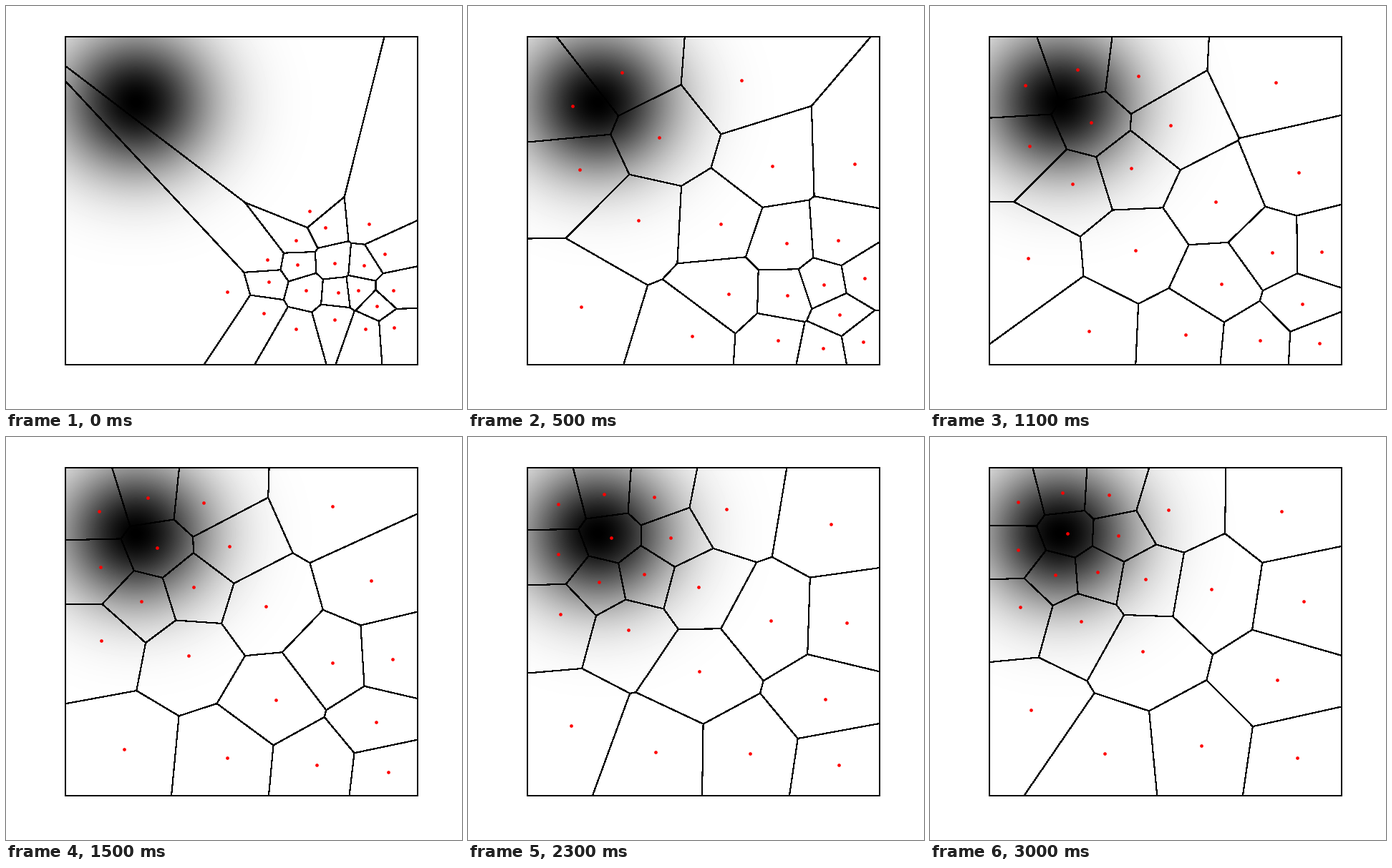
Write a matplotlib script that moves like this. It is 637 px wide and 564 px high and loops after 3.6 s.

```python
import numpy as np
import matplotlib.pyplot as plt
from matplotlib.animation import FuncAnimation
from matplotlib.collections import PolyCollection

WIDTH, HEIGHT, DPI = 637, 564, 64
LEFT, TOP, BOX_W, BOX_H = 83, 43, 492, 459
PX = 72 / DPI                      # one pixel in points
STEPS, HOLD = 31, 5                # relaxation steps, then rest on the last one
PEAK, SIGMA, FLOOR = (0.2, 0.8), 0.15, 0.01

# Starting cluster in pixels; everything after follows from the relaxation.
START = [(424, 287), (446, 310), (507, 305), (405, 328), (529, 347), (364.5, 355),
         (406.5, 362), (459, 360), (500, 363), (367, 386), (419, 398), (464, 401),
         (492, 398), (541, 398), (518, 420), (309, 400), (360, 429.5), (405, 452),
         (459, 439), (501.5, 452), (542, 449.5)]


def grid(cols, rows):
    return np.meshgrid((np.arange(cols) + 0.5) / cols, (np.arange(rows) + 0.5) / rows)


def gauss(x, y):
    return np.exp(-((x - PEAK[0]) ** 2 + (y - PEAK[1]) ** 2) / (2 * SIGMA ** 2))


GX, GY = (g.ravel() for g in grid(BOX_W // 2, BOX_H // 2))
MASS = gauss(GX, GY) + FLOOR


def relax(sites):
    """Move every site to the weighted centroid of its cell (Lloyd's step)."""
    dist = (GX[:, None] - sites[:, 0]) ** 2 + (GY[:, None] - sites[:, 1]) ** 2
    owner = dist.argmin(axis=1)

    def total(weight):
        return np.bincount(owner, weight, len(sites))

    return np.column_stack([total(MASS * GX), total(MASS * GY)]) / total(MASS)[:, None]


def build_track():
    x, y = np.array(START, float).T
    track = [np.column_stack([(x - LEFT) / BOX_W, 1 - (y - TOP) / BOX_H])]
    while len(track) < STEPS:
        track.append(relax(track[-1]))
    return track


def clip(poly, normal, offset):
    """Keep the part of poly where normal . v <= offset."""
    out = []
    for p, q in zip(poly, poly[1:] + poly[:1]):
        dp, dq = normal @ p - offset, normal @ q - offset
        if dp <= 0:
            out.append(p)
        if dp * dq < 0:
            out.append(p + dp / (dp - dq) * (q - p))
    return out


def cell(sites, i):
    """Cut the unit square by the bisectors between site i and the others."""
    poly = [np.array(c, float) for c in ((0, 0), (1, 0), (1, 1), (0, 1))]
    a = sites[i]
    for b in np.delete(sites, i, axis=0):
        poly = clip(poly, b - a, (b - a) @ (a + b) / 2)
    return poly


TRACK = build_track()

fig = plt.figure(figsize=(WIDTH / DPI, HEIGHT / DPI), dpi=DPI, facecolor="white")
ax = fig.add_axes([LEFT / WIDTH, 1 - (TOP + BOX_H) / HEIGHT, BOX_W / WIDTH, BOX_H / HEIGHT])
ax.imshow(1 - gauss(*grid(BOX_W, BOX_H)), cmap="gray", vmin=0, vmax=1, origin="lower",
          extent=(0, 1, 0, 1), aspect="auto", interpolation="nearest")
ax.set(xlim=(0, 1), ylim=(0, 1))
ax.axis("off")

# Hard-edged strokes cover every pixel they touch, so 1 px wide looks like 2 px.
walls = PolyCollection([], facecolors="none", edgecolors="black", linewidths=1.1 * PX,
                       antialiaseds=False, joinstyle="round", zorder=2)
ax.add_collection(walls, autolim=False)
ax.add_patch(plt.Rectangle((0, 0), 1, 1, fill=False, ec="black", lw=2 * PX,
                           snap=False, clip_on=False, zorder=3))
dots, = ax.plot([], [], "o", color="red", ms=4.7 * PX, mew=0, snap=False, zorder=4)


def update(frame):
    sites = TRACK[min(frame, STEPS - 1)]
    walls.set_verts([cell(sites, i) for i in range(len(sites))])
    dots.set_data(sites[:, 0], sites[:, 1])
    return walls, dots


anim = FuncAnimation(fig, update, frames=STEPS + HOLD, interval=100, repeat=True,
                     repeat_delay=0, blit=False)
plt.show()
```
